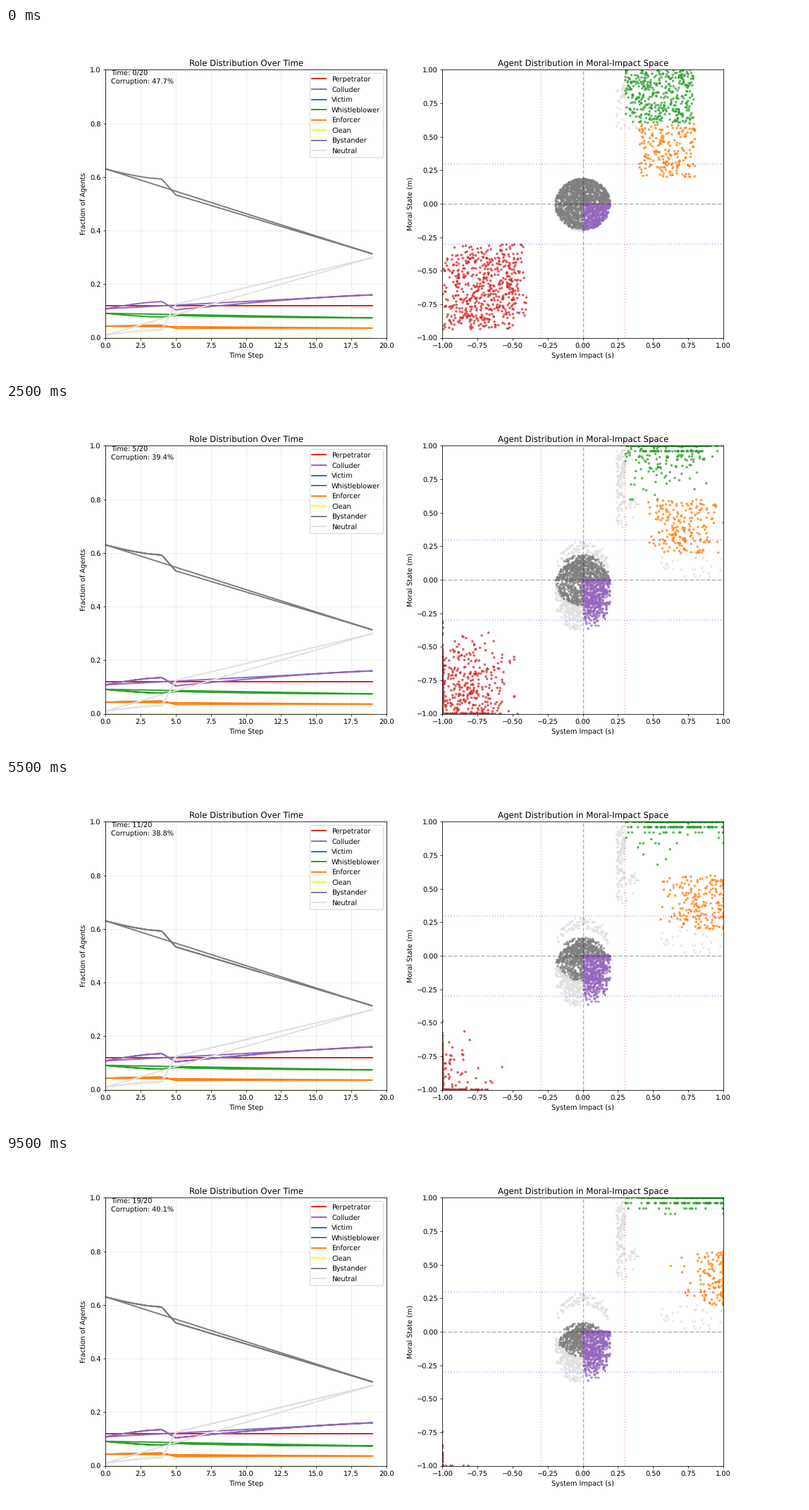
A matplotlib script that plays this animation: 1131x495 px, repeating every 10 s.

```python
import numpy as np
import matplotlib.pyplot as plt
from matplotlib.animation import FuncAnimation
from matplotlib.colors import to_rgba_array

STEPS = 20
SHOCK = 5
CORE_RADIUS = 0.197
COLORS = {
    "Perpetrator": "#d62728", "Colluder": "#9467bd", "Victim": "#1f77b4",
    "Whistleblower": "#2ca02c", "Enforcer": "#ff7f0e", "Clean": "#ffff00",
    "Bystander": "#7f7f7f", "Neutral": "#e0e0e0",
}
plt.rcParams["text.hinting"] = "none"
rng = np.random.default_rng(7)
steps = np.arange(STEPS)


def ease_out(u, power):
    return 1 - (1 - np.clip(u, 0, 1)) ** power


def role_curve(start, peak, reset, end, power=1.0):
    """Ease from start to peak, jump at the shock, then move from reset to end."""
    before = start + (peak - start) * ease_out(steps / (SHOCK - 1), 1.5)
    after = reset + (end - reset) * ease_out((steps - SHOCK) / (STEPS - 1 - SHOCK), power)
    return np.where(steps < SHOCK, before, after)


history = {
    "Perpetrator": np.full(STEPS, 0.12),
    "Colluder": role_curve(0.108, 0.135, 0.104, 0.160, 1.3),
    "Victim": np.zeros(STEPS),
    "Whistleblower": role_curve(0.091, 0.077, 0.083, 0.074, 2),
    "Enforcer": role_curve(0.043, 0.047, 0.035, 0.036),
    "Clean": np.zeros(STEPS),
    "Bystander": role_curve(0.630, 0.592, 0.533, 0.313),
    "Neutral": role_curve(0.010, 0.030, 0.125, 0.299),
}
corruption = np.interp(steps, [0, 2, 4, SHOCK, 11, 15, 19],
                       [47.7, 49.9, 50.3, 39.4, 38.8, 38.1, 40.1])


def box(n, x0, x1, y0, y1):
    return np.column_stack([rng.uniform(x0, x1, n), rng.uniform(y0, y1, n)])


def chance(n, p):
    return rng.random(n) < p


def step_perpetrators(p):
    p -= 0.085 * (rng.random(p.shape) < 0.5)
    np.clip(p, -1, 1, out=p)


def step_whistleblowers(p, rate):
    # Agents with more impact climb more readily; some slip back
    u = rng.random(len(p))
    p[:, 1] += np.where(u < np.minimum(p[:, 0], 0.75), 0.12, np.where(u > 0.8, -0.04, 0))
    p[:, 0] += 0.06 * chance(len(p), rate)
    np.clip(p, [0.3, 0.6], 1, out=p)


def step_enforcers(p):
    p[:, 0] += 0.05 * chance(len(p), 0.45)
    np.clip(p, -1, 1, out=p)


def core_roles(p):
    colluder = (p[:, 0] > 0) & (p[:, 1] < 0)
    outside = np.hypot(*p.T) > CORE_RADIUS
    return np.where(colluder, "Colluder", np.where(outside, "Neutral", "Bystander"))


def step_core(p, step):
    if step == SHOCK:
        upper = p[:, 1] > 0
        kick = rng.random(len(p)) * np.where(upper, 0.16, -0.19)
        p[:, 1] += kick * chance(len(p), np.where(upper, 0.4, 0.65))
    p[core_roles(p) == "Bystander", 1] -= 0.0085


def simulate():
    red = box(560, -0.92, -0.4, -0.86, -0.3)
    red -= 0.08 * chance(len(red), 0.5)[:, None]
    green = box(400, 0.3, 0.79, 0.6, 1.0)
    green_rate = rng.uniform(0, 0.5, len(green))
    orange = box(205, 0.4, 0.8, 0.2, 0.6)
    angle = rng.uniform(0, 2 * np.pi, 1700)
    radius = CORE_RADIUS * np.sqrt(rng.random(1700))
    core = np.column_stack([radius * np.cos(angle), radius * np.sin(angle)])

    # Neutral agents trickle in at first; the rest appear with the shock
    early = np.vstack([box(65, 0.24, 0.3, 0.56, 0.93), box(15, 0.24, 0.4, 0.56, 0.6)])
    late = np.vstack([box(70, 0.24, 0.3, 0.41, 1), box(14, 0.27, 0.39, 0.36, 0.62),
                      box(32, 0.55, 1, 0.02, 0.2)])
    drifters = np.vstack([early, late])
    arrival = np.append(rng.integers(-2, SHOCK, len(early)), np.full(len(late), SHOCK))

    snapshots = []
    for step in range(STEPS):
        if step:
            step_perpetrators(red)
            step_whistleblowers(green, green_rate)
            step_enforcers(orange)
        step_core(core, step)
        neutral = drifters[arrival <= step]
        points = np.vstack([neutral, red, green, orange, core])
        roles = (["Neutral"] * len(neutral) + ["Perpetrator"] * len(red)
                 + ["Whistleblower"] * len(green) + ["Enforcer"] * len(orange)
                 + list(core_roles(core)))
        snapshots.append((points, to_rgba_array([COLORS[r] for r in roles], 0.6)))
    return snapshots


snapshots = simulate()

fig, (ax_roles, ax_space) = plt.subplots(1, 2, figsize=(16, 7.0027), dpi=70.6875)

lines = {role: ax_roles.plot([], [], color=color, lw=2, label=role)[0]
         for role, color in COLORS.items()}
ax_roles.set(xlim=(0, 20), ylim=(0, 1), xlabel="Time Step",
             ylabel="Fraction of Agents", title="Role Distribution Over Time")
ax_roles.grid(True, alpha=0.3)
ax_roles.legend(loc="upper right")
status = ax_roles.text(0.02, 0.95, "", transform=ax_roles.transAxes)

dots = ax_space.scatter([], [], s=5, linewidths=1.5)
ax_space.set(xlim=(-1, 1), ylim=(-1, 1), xlabel="System Impact (s)",
             ylabel="Moral State (m)", title="Agent Distribution in Moral-Impact Space")
ax_space.axhline(0, color="k", ls="--", alpha=0.3)
ax_space.axvline(0, color="k", ls="--", alpha=0.3)
for level in (-0.3, 0.3):
    ax_space.axvline(level, color="r", ls=":", alpha=0.3)
    ax_space.axhline(level, color="b", ls=":", alpha=0.3)


def update(frame):
    # Each curve runs to the end, returns to its start and is retraced so far
    path = np.concatenate([steps, steps[:frame + 1]])
    for role, line in lines.items():
        line.set_data(path, history[role][path])
    status.set_text(f"Time: {frame}/{STEPS}\nCorruption: {corruption[frame]:.1f}%")
    points, colors = snapshots[frame]
    dots.set_offsets(points)
    dots.set_color(colors)
    return [*lines.values(), status, dots]


anim = FuncAnimation(fig, update, frames=STEPS, interval=500, repeat=True, repeat_delay=0)
plt.show()
```
